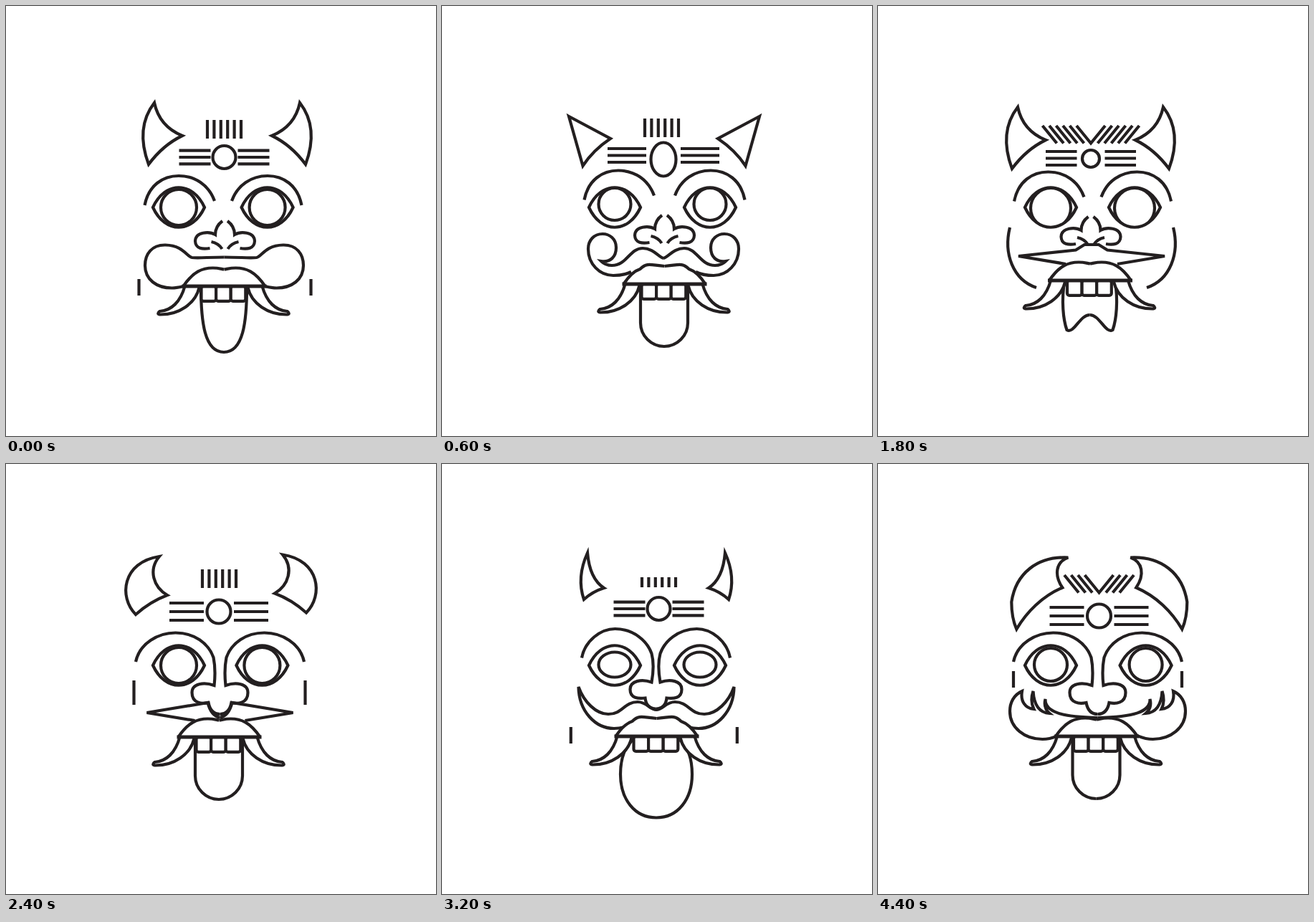
Recreate the animation shown at these times as an HTML page. Size 600 by 600 pixels, loop 4600 ms.

```html
<!DOCTYPE html>
<html lang="en">
<head>
<meta charset="utf-8">
<title>Masks</title>
<style>
  html, body { margin: 0; width: 100%; height: 100%; overflow: hidden; background: #fff; }
  svg { display: block; width: 100%; height: 100%; }
</style>
</head>
<body>
<svg viewBox="0 0 600 600">
  <defs>
    <clipPath id="lid"><path d="M-36 0C-19 -37 19 -37 36 0C19 37 -19 37 -36 0Z"/></clipPath>
  </defs>
  <g id="mask" fill="none" stroke="#231f20" stroke-width="4.2"></g>
</svg>
<script>
const LOOP = 4600;

// Left halves around x = 0; every part is mirrored.
const HORN = {
  claw: 'M-101.5 135Q-94.5 168 -62.5 181Q-89.5 194 -109.5 221Q-128.5 170 -101.5 135Z',
  spear: 'M-133 154L-75 185Q-99 201 -113.5 223Z',
  wide: 'M-52 124C-69 130 -72 148 -60 166C-88 178 -110 200 -124 224Q-131 208 -131 186C-125 146 -95 122 -52 124Z',
  moon: 'M-86 129C-102 148 -94 172 -75 183Q-99 192 -119 210C-143 186 -138 137 -86 129Z',
  fin: 'M-96 124Q-93 160 -73 173Q-89 178 -101 189Q-111.5 158 -96 124Z'
};
const BROW = {
  arch: 'M-109.5 278C-104 250 -84 237 -62 237C-39 237 -20 250 -12 272',
  bridge: 'M-103.5 271C-99 247 -77 230.5 -57 230.5C-30 231 -12 248 -6 265C-2 280 -4 294 -6 305' +
    'C-20 300 -36 303 -36 315C-36 328 -24 328 -15 327C-14 337 -8 342 0 342',
  broad: 'M-117.5 276C-112 250 -86 235.5 -62 235.5C-36 235.5 -16 250 -9 270C-6 285 -7 300 -8 309' +
    'C-22 304 -39 306 -39 319C-39 334 -25 335 -16 333C-14 344 -8 349 0 349'
};
const NOSE = {
  open: 'M-3.5 300C-9 304 -13.5 311 -13.5 319C-22 314 -41 315 -41.5 328C-41 339 -31 339.5 -21 338' +
    'M-19 329Q-9 331 -4 339'
};
const STACHE = {
  bone: 'M0 350.5C-22 350.5 -36 352 -45 351C-52 350 -57 334 -82 333.5C-101 333 -110.5 346 -110.5 362' +
    'C-110.5 382 -94 393.5 -73 393.5C-64 393.5 -58 391 -52 390',
  curl: 'M0 352C-6 351 -14 338 -29 338C-47 338 -51 362 -72 362C-77 362 -83 360 -87 356' +
    'C-74 358 -66 350 -66 337C-66 325 -75 318 -85 318C-97 318 -105 327 -105 339' +
    'C-105 360 -89 376 -70 376C-59 376 -51 374 -45 371',
  handle: 'M0 343C-9 343 -13 332 -26 332C-45 332 -47 349 -67 349C-84 349 -101 332 -108.5 311' +
    'C-108 345 -85 369 -59 369C-52 369 -48 368 -44 367',
  bow: 'M0 345C-14 345 -28 343 -42 340C-50 341 -54 349 -68 349C-85 349 -101 335 -108.5 311' +
    'C-108 345 -84 369 -60 369C-50 369 -44 366 -38 364',
  needle: 'M0 333H-10L-22 340.5L-102 349L-36 360',
  split: 'M0 354C-9 352 -14 345 -17 333L-102 347L-35 358',
  flame: 'M0 354C-50 353 -74 346 -73 328C-75 336 -73 343 -67 348C-83 347 -89 334 -90 317' +
    'C-93 326 -93 334 -89 342C-101 341 -108 331 -105.5 317C-117 322 -122.5 333 -122.5 345' +
    'C-122.5 368 -102 384 -77 384C-66 384 -60 381 -55 379'
};
const SIDE = {
  tick: 'M-118 366v23',
  long: 'M-119.5 302v34',
  cheek: 'M-114 309C-123 345 -110 382 -77 393'
};
const LIP = {
  smooth: 'M-57 0C-43 -21 -30 -25.5 -16 -25.5C-8 -25.5 -4 -24 0 -23.5',
  wavy: 'M-57 0C-48 -14 -40 -19 -34 -21C-24 -31 -18 -26 0 -25'
};
const TONGUE = {
  point: 'M-32 0C-32 50 -27 92 0 92',
  round: 'M-33 0V54A33 33 0 0 0 0 87',
  egg: 'M-33 5C-45 16 -50 34 -50 53C-50 88 -30 113.5 0 113.5',
  fork: 'M-35 0C-40 28 -37 55 -32 69C-22 75 -14 48 0 48'
};
const FANG = 'M-54 0C-60 22 -73 34 -89 35C-92 37 -92 39 -89 39.5C-62 40 -39 24 -34 2';

// start, length, line gap, ring radii, ring drop
const BAND = {
  ring: [19, 44, 9.3, 16, 16, 0],
  big: [24, 54, 9.5, 20, 20, 0],
  oval: [24, 54, 9.5, 17.5, 23.5, 5.5],
  dot: [19.5, 43.5, 9.5, 12, 12, 0.5],
  airy: [21, 48, 12, 16.5, 16.5, 0]
};
// radii, drop
const IRIS = {
  round: [25, 25, 0], small: [22.5, 22.5, -4.5], droop: [22.5, 22.5, 22],
  large: [28, 28, 1], oval: [22.5, 17.5, -1], mid: [23, 23, -1]
};

// Parts: kind or [kind, x, dy, spread]; x defaults to the middle of the eyes.
const FACES = [
  { at: 0, x: 302.8, horn: ['claw', 308.5], bars: ['tall', 304.5], band: ['ring', 304.5, 3], brow: ['arch', 303],
    nose: ['open', 305.5], eye: 'round', stache: ['bone', 304.5], mouth: ['smooth', 304.5, 391], tongue: 'point',
    side: ['tick', 305.5, 15, 2] },
  { at: 200, x: 299, horn: ['wide', 299, -12, 6], bars: 'v5', band: 'dot', brow: 'arch',
    nose: ['open', 299, -7], eye: 'oval', stache: 'curl', mouth: ['wavy', 299, 383], tongue: 'round' },
  { at: 400, x: 297, horn: ['wide', 297, 3, 3], bars: 'short', band: 'big', brow: 'bridge',
    eye: 'droop', stache: ['bone', 297, -9], mouth: ['smooth', 297, 381], tongue: 'egg' },
  { at: 600, x: 307.5, horn: ['spear', 310], bars: ['tall', 306.5, -2], band: ['oval', 309, 0.5],
    brow: ['arch', 310.5, -7.5, 2.5], nose: ['open', 310.5, -8], eye: 'small', stache: ['curl', 309],
    mouth: ['wavy', 310.5, 388], tongue: 'round' },
  { at: 800, x: 302, horn: ['wide', 302, 0, -7], bars: 'v4', band: 'airy', brow: 'broad',
    eye: 'large', stache: 'split', mouth: ['smooth', 302, 381], tongue: 'round' },
  { at: 1000, x: 300, horn: ['claw', 300, 5], bars: 'tall', band: 'ring', brow: ['arch', 300, -4],
    nose: ['open', 300, -7], eye: 'mid', stache: 'handle', mouth: ['wavy', 300, 388], tongue: 'fork' },
  { at: 1200, x: 299, horn: ['wide', 295], bars: ['v5', 295], band: ['big', 295, -0.5], brow: ['bridge', 297],
    eye: 'droop', stache: ['bow', 297], mouth: ['smooth', 295.5, 381], tongue: 'egg', side: ['tick', 296] },
  { at: 1400, x: 304, horn: ['spear', 304, -20], bars: 'short', band: 'ring', brow: 'broad',
    eye: 'round', stache: 'flame', mouth: ['wavy', 304, 383], tongue: 'round' },
  { at: 1600, x: 297.5, horn: ['fin', 297.5, 16], bars: 'tall', band: ['airy', 297.5, 2], brow: ['arch', 298, -4],
    nose: ['open', 297.5, -7], eye: 'oval', stache: 'bow', mouth: ['smooth', 297, 382], tongue: 'round', side: 'tick' },
  { at: 1800, x: 299.5, horn: ['claw', 296.5, 6], bars: ['v6', 297, 11], band: ['dot', 297, 4.5],
    brow: ['arch', 299.5, -5.5], nose: ['open', 297, -6], eye: 'large', stache: ['needle', 298],
    mouth: ['smooth', 296, 383], tongue: 'fork', side: ['cheek', 298] },
  { at: 2000, x: 302, horn: ['claw', 302, -16], bars: ['tall', 302, -8], band: 'dot', brow: 'bridge',
    eye: 'small', stache: 'handle', mouth: ['wavy', 302, 381], tongue: 'fork' },
  { at: 2200, x: 298, horn: ['moon', 298, -3], bars: 'v5', band: 'big', brow: ['arch', 298, -4],
    nose: ['open', 298, -6], eye: 'droop', stache: 'needle', mouth: ['smooth', 298, 380], tongue: 'egg' },
  { at: 2400, x: 299.2, horn: ['moon', 300], bars: ['tall', 297.5, -12], band: ['airy', 297, -2],
    brow: ['broad', 298.5], eye: 'round', stache: ['split', 298.5], mouth: ['smooth', 297.5, 381],
    tongue: 'round', side: ['long', 298] },
  { at: 2600, x: 302, horn: ['claw', 302, 4], bars: 'tall', band: ['airy', 302, 2], brow: 'broad',
    eye: 'large', stache: 'flame', mouth: ['smooth', 302, 380], tongue: 'round' },
  { at: 2800, x: 304.5, horn: ['spear', 304.5, -17], bars: 'short', band: 'dot', brow: ['arch', 304.5, -4],
    nose: ['open', 304.5, -7], eye: 'mid', stache: ['bone', 304.5, -10], mouth: ['wavy', 304.5, 380], tongue: 'egg' },
  { at: 3200, x: 300.5, horn: ['fin', 299], bars: ['short', 302.5], band: ['ring', 302.5, -6],
    brow: ['bridge', 298.5, -0.5], eye: 'oval', stache: ['handle', 299], mouth: ['wavy', 299.5, 380],
    tongue: 'egg', side: ['tick', 295.8, 1, -2] },
  { at: 3400, x: 299, horn: ['claw', 299, 3], bars: 'v5', band: 'ring', brow: 'bridge',
    eye: 'round', stache: 'handle', mouth: ['smooth', 299, 388], tongue: 'fork' },
  { at: 3800, x: 299, horn: ['moon', 299, -1], bars: 'short', band: 'airy', brow: ['arch', 299, -4],
    nose: ['open', 299, -7], eye: 'oval', stache: 'curl', mouth: ['wavy', 299, 387], tongue: 'fork' },
  { at: 4000, x: 296, horn: ['wide', 295.5, 8, 5.5], bars: 'v4', band: 'big', brow: 'bridge',
    eye: 'small', stache: 'bow', mouth: ['smooth', 296, 387], tongue: 'fork' },
  { at: 4200, x: 299, horn: ['moon', 299, 5, 2], bars: 'tall', band: 'ring', brow: 'broad',
    eye: 'droop', stache: 'split', mouth: ['smooth', 299, 381], tongue: 'egg' },
  { at: 4400, x: 307.3, horn: ['wide', 308.8, 6.5, -8.5], bars: ['v4', 308.5, -1], band: ['airy', 308.5, 4],
    brow: ['broad', 306.5], eye: 'mid', stache: ['flame', 306.5], mouth: ['smooth', 305, 380],
    tongue: 'round', side: ['tick', 306.5, -77, -0.5] }
];

const path = (d, attr = '') => `<path d="${d}" ${attr}/>`;
const move = (x, y, body) => `<g transform="translate(${x} ${y})">${body}</g>`;
const sym = (body, spread = 0, lift = 0) => {
  const half = move(-spread, 0, body);
  return half + `<g transform="translate(0 ${lift}) scale(-1 1)">${half}</g>`;
};

function part(set, spec, mid) {
  if (!spec) return '';
  const [kind, x = mid, dy = 0, spread = 0] = [].concat(spec);
  return move(x, dy, sym(path(set[kind]), spread, kind === 'moon' ? -2.5 : 0));
}

function bars(spec, mid) {
  const [kind, x = mid, dy = 0] = [].concat(spec);
  let body = '';
  if (kind[0] === 'v') {
    body = path('M-20 156L0 180.5L20 156');
    for (let i = 1; i < +kind[1]; i++) body += sym(path(`M${-20 - 9.5 * i} 156l20 24.5`));
  } else {
    const line = kind === 'tall' ? '159v26' : '158v14';
    for (let i = 0; i < 6; i++) body += path(`M${9.4 * (i - 2.5)} ${line}`);
  }
  return move(x, dy, body);
}

function band(spec, mid) {
  const [kind, x = mid, dy = 0] = [].concat(spec);
  const [start, len, gap, rx, ry, drop] = BAND[kind];
  const lines = [-gap, 0, gap].map(y => path(`M${-start} ${y}h${-len}`)).join('');
  return move(x, 208 + dy, sym(lines) + `<ellipse cy="${drop}" rx="${rx}" ry="${ry}"/>`);
}

function eyes(kind, mid) {
  const [rx, ry, drop] = IRIS[kind];
  const eye = path('M-36 0C-19 -37 19 -37 36 0C19 37 -19 37 -36 0Z') +
    `<g clip-path="url(#lid)"><ellipse cy="${drop}" rx="${rx}" ry="${ry}"/></g>`;
  return move(241, 281, eye) + move(2 * mid - 241, 281, eye);
}

function mouth([kind, x, y], tongue) {
  const white = 'fill="#fff"';
  let teeth = '';
  for (let i = 0; i < 3; i++)
    teeth += `<rect x="${-31 + 20.6 * i}" width="20.6" height="20.8" rx="3" ${white}/>`;
  return move(x, y,
    move(-0.5, 0, sym(path(TONGUE[tongue]))) +
    move(-1, 0, sym(path(FANG, white)) + teeth) +
    sym(path(LIP[kind] + 'V0Z', white + ' stroke="none"') + path(LIP[kind])) +
    path('M-59 0H59', 'stroke-width="5"'));
}

function draw(f) {
  return part(HORN, f.horn, f.x) + bars(f.bars, f.x) + band(f.band, f.x) +
    part(BROW, f.brow, f.x) + eyes(f.eye, f.x) + part(NOSE, f.nose, f.x) +
    part(SIDE, f.side, f.x) + part(STACHE, f.stache, f.x) + mouth(f.mouth, f.tongue);
}

const mask = document.getElementById('mask');
const begin = performance.now();
let shown = null;

function update(now) {
  const t = Math.max(0, now - begin) % LOOP;
  const face = FACES.filter(f => f.at <= t).pop();
  if (face !== shown) {
    shown = face;
    mask.innerHTML = draw(face);
  }
  requestAnimationFrame(update);
}
update(begin);
</script>
</body>
</html>
```
